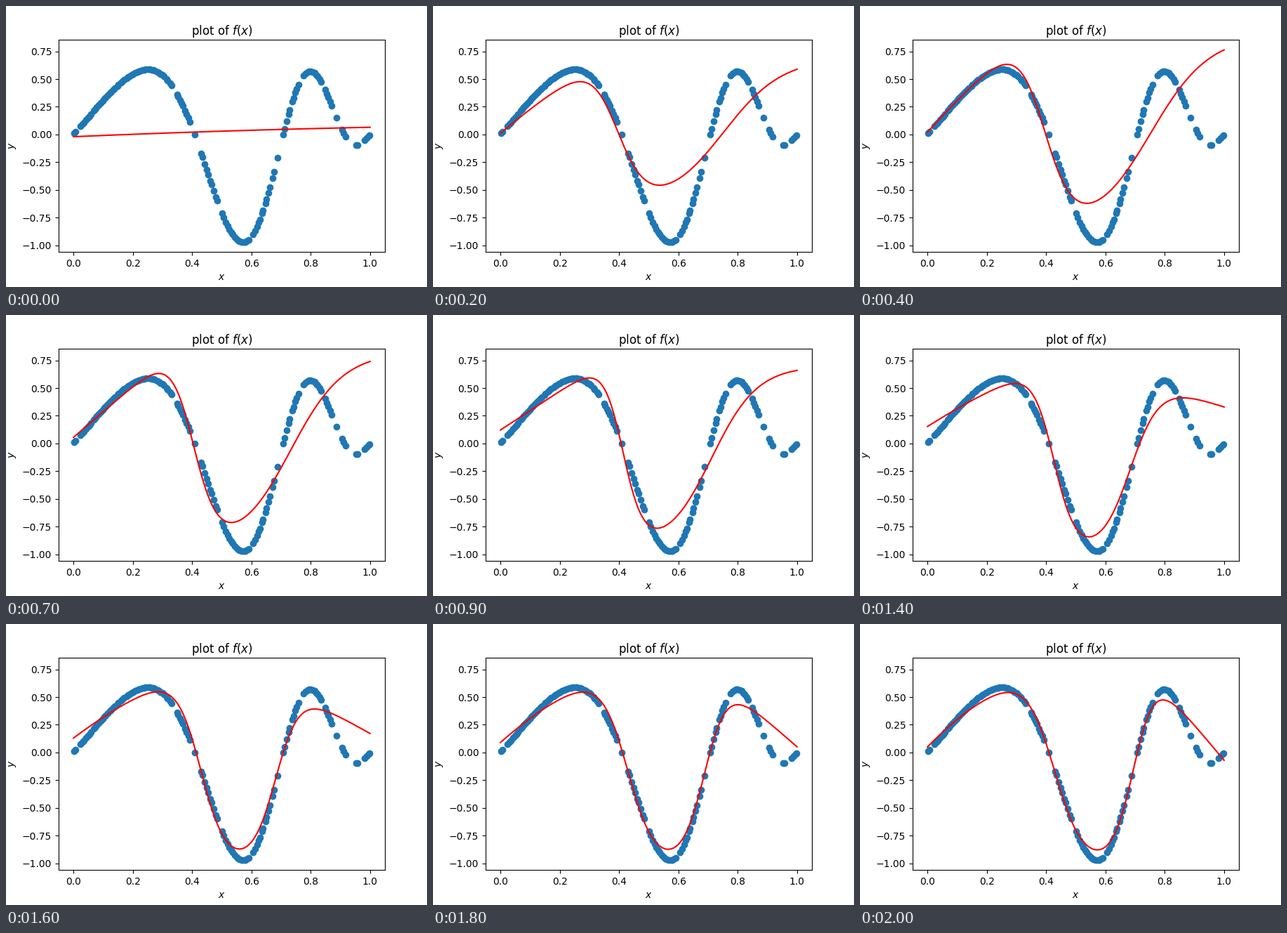
Recreate the animation shown at these times as a matplotlib script. Size 600x400 px, loop 2100 ms.

```python
import numpy as np
import matplotlib.pyplot as plt
from matplotlib.animation import FuncAnimation

FRAMES, INTERVAL = 21, 100
WARMUP = 4

# Stretches of x that hold samples, with gaps between them
RUNS = [(.002, .007), (.024, .331), (.348, .392), (.409, .409), (.43, .485),
        (.5, .592), (.606, .675), (.689, .689), (.707, .76), (.777, .835),
        (.848, .87), (.888, .888), (.906, .918), (.954, .96), (.983, .999)]

# The fit is a rising hill, a drop into a trough and a climb to a tail.
# Each property moves through these values at the key times.
TIMES = [WARMUP, 7, 11, 16, 20]
TRACKS = dict(
    start=[.02, .055, .188, .13, .05],
    slope=[2.95, 2.3, 1.2, 2, 2.75],
    bend=[1, 0, 0, 1.2, 2.6],
    trough=[-.9, -.97, -.97, -1.02, -1.02],
    drop_x=[.387, .399, .42, .426, .425],
    drop_w=[.047, .04, .0285, .042, .048],
    climb_x=[.75, .73, .692, .687, .702],
    climb_w=[.1, .09, .065, .04, .036],
    end=[.9, .825, .572, .172, -.07],
    fall=[0, 0, 0, 1.5, 3.2],
)


def target(x):
    return np.sin(np.pi * x) * np.cos(3 * np.pi * x**2)


def samples(step=.0062, jitter=.0015):
    rng = np.random.default_rng(5)
    x = np.concatenate([np.linspace(a, b, 1 + int(np.ceil((b - a) / step)))
                        for a, b in RUNS])
    return np.clip(x + rng.uniform(-jitter, jitter, x.size), .002, .999)


def gate(x, center, width):
    """Smooth step from 0 to 1."""
    return 1 / (1 + np.exp((center - x) / width))


def fit(x, t):
    p = {name: np.interp(t, TIMES, vals) for name, vals in TRACKS.items()}
    hill = p["start"] + p["slope"] * x - p["bend"] * x**2
    tail = p["end"] + p["fall"] * (1 - x)
    y = (hill + (p["trough"] - hill) * gate(x, p["drop_x"], p["drop_w"])
         + (tail - p["trough"]) * gate(x, p["climb_x"], p["climb_w"]))
    # Grow out of the untrained, nearly straight line
    flat = -.02 + .115 * x - .03 * x**2
    rest = (1 - min(t / WARMUP, 1))**2
    return rest * flat + (1 - rest) * y


fig, ax = plt.subplots(figsize=(6, 4), dpi=100)
fig.subplots_adjust(left=.125, right=.9, bottom=.125, top=.88)

xs = np.linspace(0, 1, 200)
dots = samples()
ax.scatter(dots, target(dots))
line, = ax.plot(xs, fit(xs, 0), "r")
ax.set(xlim=(-.05, 1.05), ylim=(-1.0592, .855), xlabel="$x$", ylabel="$y$")
ax.set_title("plot of $f(x)$", pad=5.3)


def update(frame):
    line.set_ydata(fit(xs, frame))
    return line,


anim = FuncAnimation(fig, update, frames=FRAMES, interval=INTERVAL,
                     repeat=True, repeat_delay=0)
plt.show()
```
